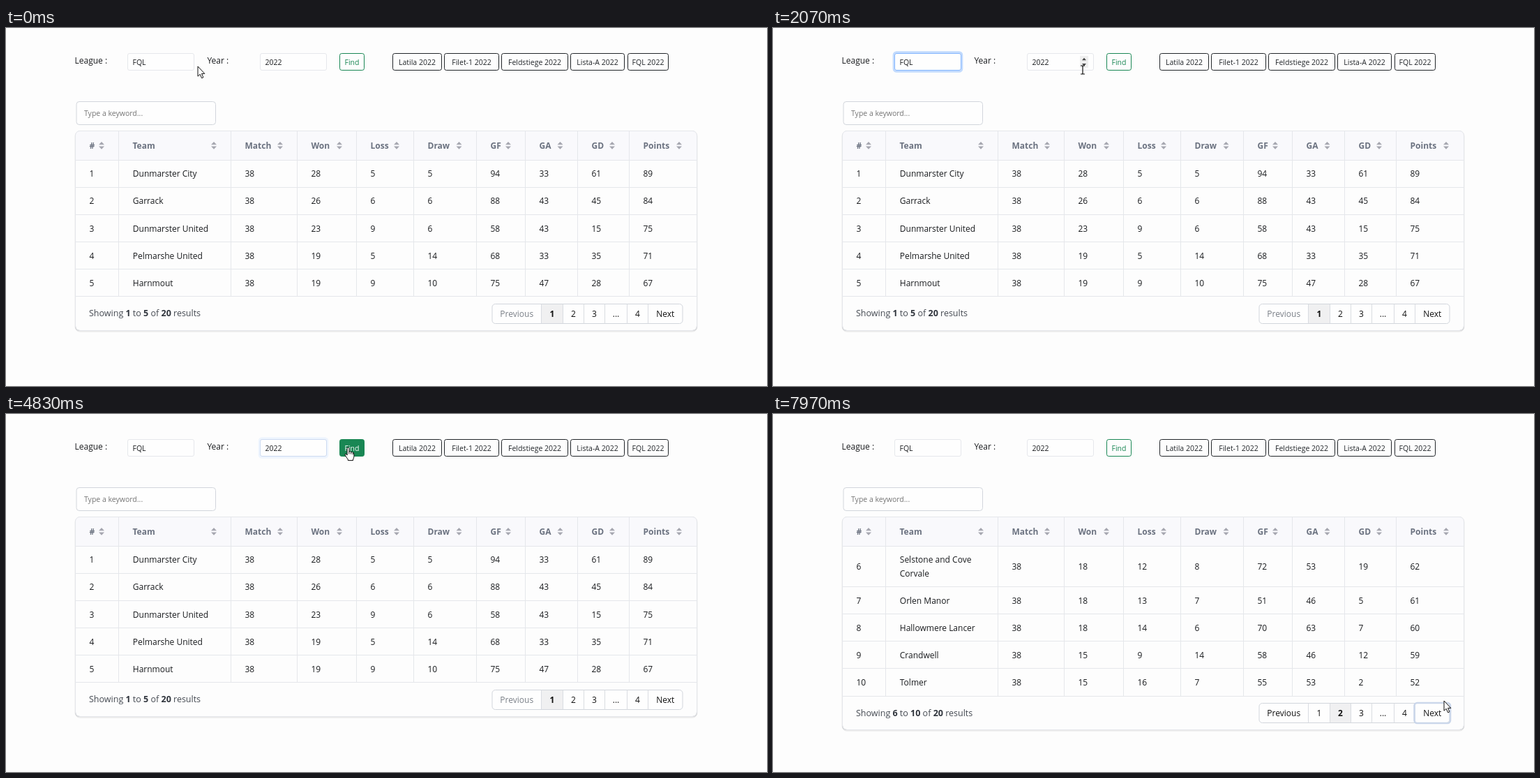
Write an HTML page that moves like this. It is 1091x513 px and loops after 8000 ms.

```html
<!DOCTYPE html>
<html lang="en">
<head>
<meta charset="utf-8">
<title>League table</title>
<style>
  html, body { margin: 0; width: 100%; height: 100%; overflow: hidden; background: #fdfdfd; }
  svg { display: block; width: 100%; height: 100%; }
  text { font-family: "Open Sans", "Noto Sans", sans-serif; font-size: 12px; fill: #1a1c1f; white-space: pre; }
  .small { font-size: 10.5px; }
  .mid { text-anchor: middle; }
  .bold { font-weight: 700; }
  .head { font-weight: 700; fill: #6b7280; }
</style>
</head>
<body>
<svg id="stage" viewBox="0 0 1091 513"></svg>
<script>
const LOOP = 8000, NS = 'http://www.w3.org/2000/svg';
const stage = document.getElementById('stage');

function el(parent, tag, attrs = {}, content) {
  const node = document.createElementNS(NS, tag);
  for (const k in attrs) node.setAttribute(k, attrs[k]);
  if (content !== undefined) node.textContent = content;
  parent.appendChild(node);
  return node;
}
const group = (parent = stage) => el(parent, 'g');
const label = (p, x, y, s, cls = '', fill) =>
  el(p, 'text', { x, y, class: cls, ...(fill && { style: 'fill:' + fill }) }, s);
const box = (p, x, y, x2, y2, attrs) =>
  el(p, 'rect', { x, y, width: x2 - x, height: y2 - y, fill: 'none', ...attrs });
const line = (p, x1, y1, x2, y2, stroke = '#e5e7eb') => el(p, 'line', { x1, y1, x2, y2, stroke });
const path = (p, d, fill, attrs) => el(p, 'path', { d, fill, ...attrs });
const show = (node, on) => node.setAttribute('visibility', on ? 'visible' : 'hidden');
const inside = (x, y, [x1, y1, x2, y2]) => x >= x1 && x <= x2 && y >= y1 && y <= y2;

const LEAGUES = ['FQL', 'Filet-1', 'Feldstiege', 'Lista-A', 'Latila'];
const EDGES = [99.5, 161.5, 322.5, 417.5, 502.5, 584.5, 674.5, 744.5, 819.5, 893.5, 990.5];
const HEADS = ['#', 'Team', 'Match', 'Won', 'Loss', 'Draw', 'GF', 'GA', 'GD', 'Points'];
const SORT_X = [137, 298, 393, 478, 560, 649.5, 720, 794.5, 869, 965];
const TEXT_X = EDGES.map(x => x + 20);
// name, won, draw, goals for, goals against
const TEAMS = [
  ['Dunmarster City', 28, 5, 94, 33], ['Garrack', 26, 6, 88, 43],
  ['Dunmarster United', 23, 6, 58, 43], ['Pelmarshe United', 19, 14, 68, 33],
  ['Harnmout', 19, 10, 75, 47], ['Selstone and Cove|Corvale', 18, 8, 72, 53],
  ['Orlen Manor', 18, 7, 51, 46], ['Hallowmere Lancer', 18, 6, 70, 63],
  ['Crandwell', 15, 14, 58, 46], ['Tolmer', 15, 7, 55, 53]
];

// Filter bar
label(stage, 98.5, 50.5, 'League :');
label(stage, 288.5, 50.5, 'Year :');

function field(x, x2) {
  const ring = box(stage, x - 1.4, 34.6, x2 + 1.4, 62.4,
    { rx: 4, stroke: '#c2dbfe', 'stroke-width': 2.8 });
  box(stage, x, 36.5, x2, 60.5, { rx: 2.5, stroke: '#e6e8ec', fill: '#fefefe' });
  const edge = box(stage, x, 36.5, x2, 60.5, { rx: 2.5, stroke: '#86b7fe' });
  return a => { ring.setAttribute('opacity', a); edge.setAttribute('opacity', a); };
}
const focusLeague = field(174.5, 269.5);
const focusYear = field(364.5, 459.5);
label(stage, 181.5, 52.7, LEAGUES[0], 'small');
const year = label(stage, 371.5, 52.7, '2022', 'small');
const caret = line(stage, 396.5, 42, 396.5, 56, '#111');

const spinner = group();
box(spinner, 440, 40, 452, 57, { fill: '#efefef' });
const spinUp = box(spinner, 440, 40, 452, 48.5, { fill: '#bdbdbd' });
const spinDown = box(spinner, 440, 48.5, 452, 57, { fill: '#bdbdbd' });
path(spinner, 'M443 46.2l3-3.4 3 3.4zM443 51l3 3.4 3-3.4z', '#444');

function button(x, x2, name, color) {
  const back = box(stage, x, 36.5, x2, 60.5, { rx: 2.8, stroke: color });
  const text = label(stage, (x + x2) / 2, 52.7, name, 'small mid', color);
  return {
    area: [x, 36, x2, 61],
    hover(on) {
      back.setAttribute('fill', on ? color : 'none');
      text.style.fill = on ? '#fff' : color;
    }
  };
}
const buttons = [button(478.5, 513.5, 'Find', '#198754')];
[[554.5, 624.5, 4], [628.5, 706.5, 1], [710.5, 805.5, 2], [809.5, 886.5, 3], [891.5, 949.5, 0]]
  .forEach(([x, x2, i]) => buttons.push(button(x, x2, LEAGUES[i] + ' 2022', '#212529')));

box(stage, 101, 105.5, 300.5, 138.5, { rx: 4, stroke: '#d2d6dc', fill: '#fefefe' });
label(stage, 112, 126.3, 'Type a keyword...', 'small', '#757575');

// Table
function tablePage(first, focused) {
  const g = group(), count = 5, bottom = first ? 452.5 : 433.5;
  box(g, 99.5, 148.5, 990.5, bottom + 1.2, { rx: 6.5, stroke: '#000', opacity: .07, 'stroke-width': 2 });
  box(g, 99.5, 147.5, 990.5, bottom, { rx: 6.5, fill: '#fdfdfd', stroke: '#e5e7eb' });
  path(g, `M99.5 ${bottom - 6}q0 6 6 6H984.5q6 0 6-6`, 'none', { stroke: '#c9cacd' });
  const cells = HEADS.map((h, i) => {
    const l = EDGES[i], r = EDGES[i + 1];
    const d = i === 0 ? `M${l} 189V154q0-6.5 6.5-6.5H${r}V189z`
      : i === 9 ? `M${l} 189V147.5H${r - 6.5}q6.5 0 6.5 6.5V189z`
      : `M${l} 189V147.5H${r}V189z`;
    return path(g, d, '#f9f9fc');
  });
  box(g, 99.5, 147.5, 990.5, bottom, { rx: 6.5, stroke: '#e5e7eb' });
  HEADS.forEach((h, i) => {
    label(g, TEXT_X[i], 172.5, h, 'head');
    path(g, `M${SORT_X[i] - 4} 167.2l4-4.2 4 4.2zM${SORT_X[i] - 4} 169.6l4 4.2 4-4.2z`, '#a6a7b0');
  });

  let y = 189.3;
  line(g, 99.5, 189.5, 990.5, 189.5);
  for (let i = first; i < first + count; i++) {
    const [name, won, draw, gf, ga] = TEAMS[i], lines = name.split('|');
    const h = 39.1 + (lines.length - 1) * 19.2, base = y + h / 2 + 4.5;
    const vals = [i + 1, '', 38, won, 38 - won - draw, draw, gf, ga, gf - ga, 3 * won + draw];
    vals.forEach((v, c) => label(g, TEXT_X[c], base, v));
    lines.forEach((s, k) => label(g, TEXT_X[1] + .3, y + 24 + k * 19.2, s));
    y += h;
    line(g, 99.5, Math.floor(y) + .5, 990.5, Math.floor(y) + .5);
  }
  EDGES.slice(1, -1).forEach(x => line(g, x, 148, x, y));

  const foot = label(g, 119, y + 28.5, '', '', '#454a52');
  foot.style.fontSize = '12.5px';
  ['Showing ', first + 1, ' to ', first + count, ' of ', 20, ' results']
    .forEach((s, i) => el(foot, 'tspan', i % 2 ? { class: 'bold', style: 'fill:#2f343c' } : {}, s));

  const top = first ? 414.5 : 395.5, current = first / count + 1;
  const xs = [697, 767.5, 798.5, 828.5, 858.5, 890.5, 920.5, 970];
  box(g, 697, top, 970, top + 28, { rx: 4.5, fill: '#fefefe' });
  box(g, xs[current], top, xs[current + 1], top + 28, { fill: '#f0f0f1' });
  const next = path(g, `M920.5 ${top}h45q4.5 0 4.5 4.5v19q0 4.5-4.5 4.5h-45z`, '#f1f1f1');
  box(g, 697, top, 970, top + 28, { rx: 4.5, stroke: '#d2d6dc' });
  xs.slice(1, -1).forEach(x => line(g, x, top, x, top + 28, '#d9dce1'));
  if (focused) box(g, 919.5, top - .5, 971, top + 28.5, { rx: 4, stroke: '#cbd7ea', 'stroke-width': 2.6 });
  let nextText;
  ['Previous', '1', '2', '3', '...', '4', 'Next'].forEach((s, i) => {
    nextText = label(g, (xs[i] + xs[i + 1]) / 2, top + 18.4, s,
      'mid' + (i === current ? ' bold' : ''), i || first ? '#111' : '#7b8088');
  });

  return {
    g, nextArea: [920, top, 970, top + 28],
    hover(x, y, onNext) {
      cells.forEach((c, i) => c.setAttribute('fill',
        inside(x, y, [EDGES[i], 148, EDGES[i + 1], 189]) ? '#e5e7eb' : '#f9f9fc'));
      show(next, onNext);
      nextText.style.fill = onNext ? '#5f6368' : '#111';
    }
  };
}
const pages = [tablePage(0, false), tablePage(5, true)];

// League list
const menu = group();
const shade = box(menu, 174.5, 61, 269, 141.5, { fill: '#fff', rx: 4 });
shade.style.filter = 'drop-shadow(0 9px 12px rgba(0,0,0,.36))';
box(menu, 174.5, 61, 269, 141.5, { fill: '#fff', stroke: '#8a8d93', rx: 4 });
box(menu, 175, 61.5, 268.5, 77.5, { fill: '#1e90f0' });
LEAGUES.forEach((s, i) => label(menu, 181.5, 73.4 + 16 * i, s, 'small', i ? '' : '#fff'));

// Pointers, each with its hot spot at the origin
const ink = { stroke: '#111', 'stroke-width': 1, 'stroke-linejoin': 'round' };
const pointer = group();
const shapes = {
  arrow: path(pointer, 'M0 0V14.2L3.2 11.3 5.6 16.8 7.9 15.8 5.5 10.4H9.8z', '#fff', ink),
  hand: path(pointer, 'M-1.4 1.4Q-1.4 0 0 0T1.4 1.4V6Q3.8 5 4.2 6.6 6.4 5.8 6.8 7.4 8.4 7 8.4 9V12.5Q8.4 15 7 17V18.6H-.2V17Q-2.6 14.2-4.4 10.8-4.8 9-3.2 9.2L-1.4 11z' +
    'M1.4 6V9.4M4.2 6.6V9.6M6.8 7.4V10', '#fff', ink),
  beam: path(pointer, 'M-3-6H-1Q0-6 0-5Q0-6 1-6H3M0-5V5M-3 6H-1Q0 6 0 5Q0 6 1 6H3', 'none',
    { stroke: '#111', 'stroke-width': 1.2 })
};

// time, x, y
const ROUTE = [
  [0, 275, 55], [100, 275, 55], [520, 236, 50], [850, 232, 49], [1150, 230.5, 71], [1400, 230.5, 71],
  [1740, 330, 37], [2070, 444, 60], [2300, 446, 52], [2550, 445, 45], [3850, 445, 45],
  [4050, 446, 53], [4300, 446, 53], [4650, 490.5, 48], [5100, 490.5, 48], [5830, 914, 405],
  [6200, 967, 411], [6600, 967, 411], [7050, 991, 439], [7480, 960, 431], [7850, 962, 411],
  [LOOP, 962, 411]
];
function whereAt(t) {
  const i = ROUTE.findIndex(k => k[0] > t), a = ROUTE[i - 1], b = ROUTE[i];
  const u = (t - a[0]) / (b[0] - a[0]), e = u * u * (3 - 2 * u);
  return [a[1] + (b[1] - a[1]) * e, a[2] + (b[2] - a[2]) * e];
}

const OPEN = 760, CHOOSE = 1400, UP = 2650, DOWN = 4150, FIND = 4720, TURN = 6620;
const clamp = v => Math.max(0, Math.min(1, v));
const fade = (t, on, off) => clamp((t - on) / 150) * clamp(1 - (t - off) / 150);

function render(t) {
  const [x, y] = whereAt(t);
  const opened = t >= OPEN && t < CHOOSE, editing = t >= UP && t < FIND;
  const overYear = inside(x, y, [365, 36, 459, 61]);
  const overSpin = inside(x, y, [439, 40, 453, 57]);

  focusLeague(fade(t, OPEN, UP));
  focusYear(fade(t, UP, FIND));
  show(menu, opened);
  year.textContent = t >= UP && t < DOWN ? '2023' : '2022';
  show(caret, editing && (t - (t < DOWN ? UP : DOWN)) % 1000 < 500);
  show(spinner, overYear || editing);
  spinUp.setAttribute('opacity', overSpin && y < 48.5 ? 1 : 0);
  spinDown.setAttribute('opacity', overSpin && y >= 48.5 ? 1 : 0);

  let overButton = false;
  for (const b of buttons) {
    const on = inside(x, y, b.area);
    b.hover(on);
    overButton = overButton || on;
  }
  const page = pages[t < TURN ? 0 : 1];
  const onNext = inside(x, y, page.nextArea);
  for (const p of pages) {
    show(p.g, p === page);
    p.hover(x, y, p === page && onNext);
  }

  const kind = overButton || onNext || inside(x, y, [100, 148, 990, 189]) ? 'hand'
    : overYear && !overSpin ? 'beam' : 'arrow';
  for (const k in shapes) show(shapes[k], k === kind);
  pointer.setAttribute('transform', `translate(${x.toFixed(2)} ${y.toFixed(2)})`);
}

const start = performance.now();
function tick() {
  render((performance.now() - start) % LOOP);
  requestAnimationFrame(tick);
}
tick();
</script>
</body>
</html>
```
